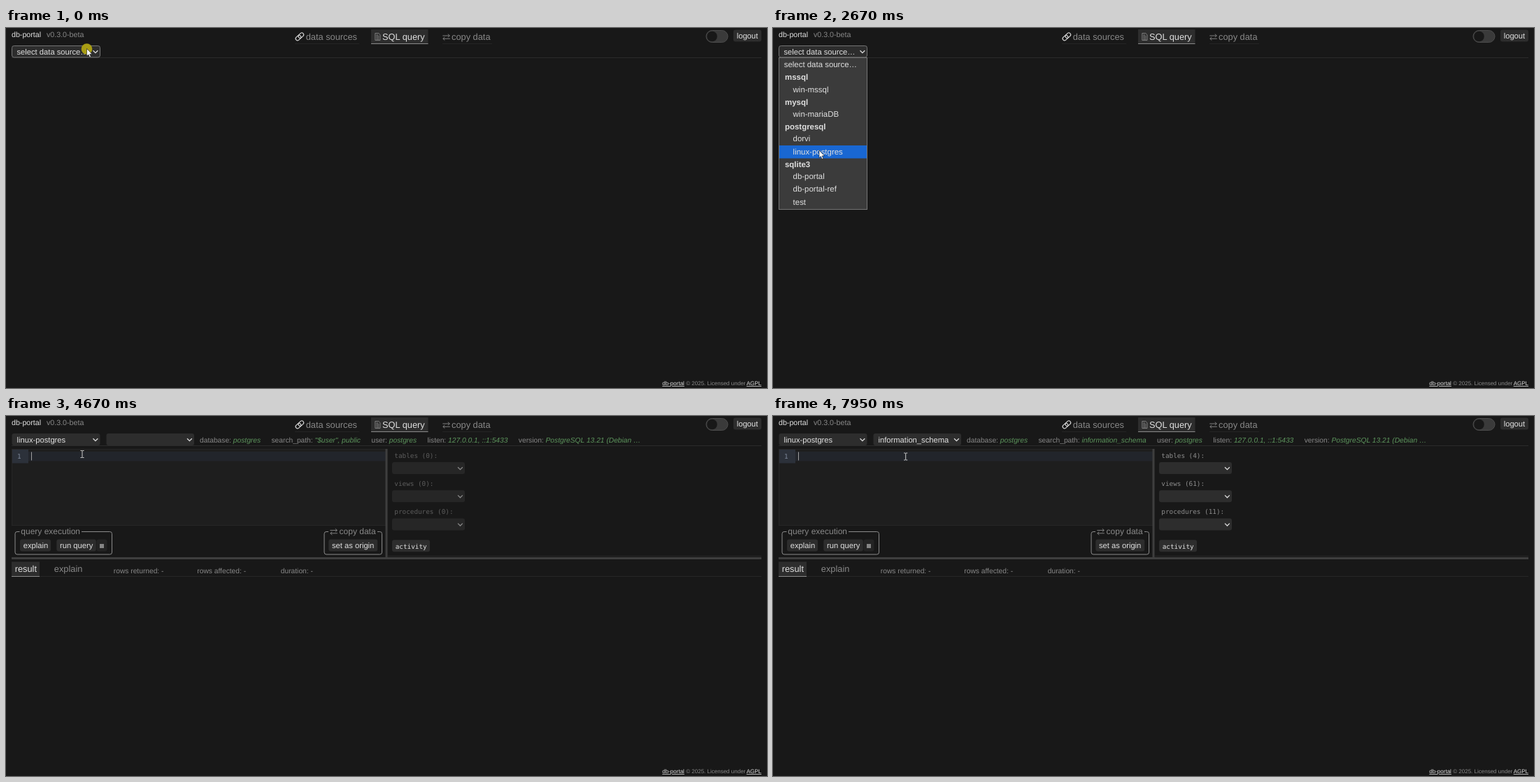
An HTML page for the animation above (8 s loop, 1088 by 515 pixels).

```html
<!DOCTYPE html>
<html lang="en">
<head>
<meta charset="utf-8">
<title>db-portal</title>
<style>
html, body { margin: 0; width: 100%; height: 100%; overflow: hidden; background: #181818; }
svg { display: block; }
text { font: 11.2px "Liberation Sans", Arial, sans-serif; fill: #e0e0e0; text-rendering: geometricPrecision; white-space: pre; }
.nav { font-size: 12.8px; }
.title { font-size: 10.67px; }
.legend { font-size: 12px; }
.info { font-size: 10.24px; }
.foot { font-size: 8px; }
.list { font-size: 11.45px; }
.mono { font: 9.34px "DejaVu Sans Mono", monospace; }
.dim { fill: #888; }
.bold { font-weight: bold; }
.link { fill: #ddd; text-decoration: underline; }
.value { fill: #5d955d; font-style: italic; }
.box { fill: #2d2d2d; }
.line { fill: none; stroke: #8a8a8a; }
.icon { fill: none; stroke: #888; stroke-width: .9; }
.popup { fill: #3b3b3b; stroke: #757575; }
.focus { fill: none; stroke: #757575; }
.hover { fill: #1967d2; }
</style>
</head>
<body>
<svg id="stage" width="1088" height="515" viewBox="0 0 1088 515"></svg>
<script>
const LOOP = 8000;

// Markup helpers; `on` holds the time spans in which an element shows.
const text = (x, y, str, cls = '') => `<text x="${x}" y="${y}" class="${cls}">${str}</text>`;
const rect = (x, y, w, h, attrs = '') => `<rect x="${x}" y="${y}" width="${w}" height="${h}" ${attrs}/>`;
const path = (d, attrs = 'class="line"') => `<path d="${d}" ${attrs}/>`;
const group = (on, ...parts) => `<g data-on="${on}">${parts.join('')}</g>`;
const button = (x, y, w, label, cls) => rect(x, y, w, 17, 'rx="3" class="box"') + text(x + 4.7, y + 12.2, label, cls);
const swap = (x, y) => path(`M${x} ${y - 2}h10m-2.5-2.3 2.5 2.3-2.5 2.3M${x + 10.5} ${y + 2.3}h-10m2.5-2.3-2.5 2.3 2.5 2.3`, 'class="icon"');
const select = (x, y, w, fill = '#2d2d2d', arrow = '#ddd') =>
  rect(x, y, w, 17, `rx="3" fill="${fill}"`) +
  path(`M${x + w - 10} ${y + 7.2}l3.4 3.4 3.4-3.4`, `fill="none" stroke="${arrow}" stroke-width="1.3"`);

function header() {
  return [
    text(8, 13.2, 'db-portal', 'title'), text(58, 13.2, 'v0.3.0-beta', 'title dim'),
    rect(522, 2, 81.5, 20.5, 'class="box"'), path('M522 22.5h81.5'),
    path('M413 22.5h92M624 22.5h71', 'stroke="#242424"'),
    '<g transform="rotate(-42 420 12.5)" fill="none" stroke="#ddd" stroke-width="1.1">',
    rect(413.2, 9.6, 8.4, 5.4, 'rx="2.7"'), rect(418.4, 9.6, 8.4, 5.4, 'rx="2.7"'), '</g>',
    text(428.7, 17, 'data sources', 'nav dim'),
    path('M527.8 7.5h5l2.2 2.2v7.8h-7.2zM529.2 10h3M529.2 12h4.4M529.2 14h4.4M529.2 16h4.4', 'class="icon"'),
    text(538, 17, 'SQL query', 'nav'),
    swap(624.3, 13), text(637, 17, 'copy data', 'nav dim'),
    rect(1001, 3.5, 31, 17, 'rx="8.5" fill="#3a3a3a" stroke="#4c4c4c"'),
    '<circle cx="1009.5" cy="12" r="7.3" fill="#181818"/>',
    button(1040, 2.5, 40, 'logout'),
    path('M8 42.5h1072', 'stroke="#2b2b2b"'),
    text(938.3, 511, 'db-portal', 'foot link'),
    text(972.2, 511, '© 2025. Licensed under', 'foot dim'),
    text(1058.7, 511, 'AGPL', 'foot link'),
  ].join('');
}

function info(searchPath) {
  const facts = {
    database: 'postgres', search_path: searchPath, user: 'postgres',
    listen: '127.0.0.1, ::1:5433', version: 'PostgreSQL 13.21 (Debian …',
  };
  const spans = Object.entries(facts).map(([key, value], i) =>
    `<tspan dx="${i ? 15.4 : 0}">${key}: </tspan><tspan class="value">${value}</tspan>`);
  return text(277, 37.8, spans.join(''), 'info dim');
}

function workspace() {
  return [
    rect(8.5, 47.5, 534.5, 109, 'fill="#1e1e1e" stroke="#262626"'),
    rect(9, 48, 23, 19.5, 'fill="#2c313a"'),
    rect(32, 51, 511, 13.5, 'fill="#22252b"'),
    text(16, 61, '1', 'mono" style="fill:#7d8799'),
    rect(542.5, 47, 3, 155.5, 'fill="#3e3e3e"'),
    rect(8, 202, 1072, 3, 'fill="#3e3e3e"'),
    path('M546 200.5h534M8 229.5h1072', 'stroke="#272727"'),
    path('M19.5 165.5H16q-3 0-3 3V195q0 3 3 3h132.5q3 0 3-3v-26.5q0-3-3-3H108'),
    text(21.3, 169.3, 'query execution', 'legend dim'),
    button(20, 176.5, 44, 'explain'), button(72.3, 176.5, 56.5, 'run query'),
    rect(129.5, 176.5, 15, 17, 'rx="3" fill="#242424"'), rect(134, 183, 6, 6, 'fill="#858585"'),
    path('M461 165.5h-3q-3 0-3 3V195q0 3 3 3h76.5q3 0 3-3v-26.5q0-3-3-3H531'),
    swap(463.3, 165.5), text(476.6, 169.3, 'copy data', 'legend dim'),
    button(461.3, 176.5, 70, 'set as origin'),
    rect(8, 208.5, 40, 21, 'class="box"'), path('M8 229.5h40'),
    text(12.7, 223.3, 'result', 'nav'), text(68.8, 223.3, 'explain', 'nav dim'),
    ...['rows returned', 'rows affected', 'duration'].map((s, i) =>
      text(153.8 + i * 119.5, 224.8, s + ': -', 'info dim')),
  ].join('');
}

function objects(counts) {
  const empty = !counts[0];
  return ['tables', 'views', 'procedures'].map((name, i) => {
    const y = 66 + i * 40.2;
    return text(555.3, y - 6, `${name} (${counts[i]}):`, `mono" style="fill:${empty ? '#5c5c5c' : '#8c8c8c'}`) +
      select(552, y, 104, empty ? '#262626' : '#2d2d2d', empty ? '#888' : '#ddd');
  }).join('') + button(552, 177.3, 54, 'activity', 'mono');
}

// Menu rows: label, middle, left edge (group headings have none).
const menu = [
  ['select data source…', 51.5, 15.7], ['mssql', 70], ['win-mssql', 87.5, 28.6], ['mysql', 105.5],
  ['win-mariaDB', 122.5, 28.6], ['postgresql', 141], ['dorvi', 158, 28.6], ['linux-postgres', 176.8, 28.6],
  ['sqlite3', 195], ['db-portal', 212, 28.6], ['db-portal-ref', 230, 28.6], ['test', 248.5, 28.6],
];

document.getElementById('stage').innerHTML = [
  header(),
  select(8.5, 25, 126),
  group('0-3430', text(15.5, 38, 'select data source…')),
  group('3430-8000', text(15.5, 38, 'linux-postgres'), workspace(), select(143.5, 25, 125.5)),
  group('3180-3430', text(143, 37.3, 'connecting', 'nav dim')),
  group('3430-6950', info('"$user", public')),
  group('6950-8000', info('information_schema')),
  group('3430-3680 6440-6950', button(552, 60, 54, 'activity', 'mono')),
  group('3680-6440', objects([0, 0, 0])),
  group('6950-8000', objects([4, 61, 11])),
  group('6440-8000', text(150.5, 38, 'information_schema')),
  group('3680-4180 4670-5170 7450-8000', path('M36.5 51.5v12', 'stroke="#a0a0a0"')),
  group('0-3180', rect(8.5, 25.5, 126, 16.5, 'rx="3" class="focus"')),
  group('5170-6440', rect(143.5, 25.5, 125, 16.5, 'rx="3" class="focus"')),
  group('680-3180',
    rect(8.5, 42.5, 126, 217, 'class="popup"'),
    rect(9, 43, 125, 18.5, 'id="hover" class="hover"'),
    ...menu.map(([label, y, x]) => text(x || 17, y + 4, label, x ? 'list' : 'list bold'))),
  group('5440-6440',
    rect(143.5, 42.5, 125, 34, 'class="popup"'),
    group('5440-6180', rect(144, 43, 124, 16.5, 'class="hover"')),
    group('6180-6440', rect(144, 59.5, 124, 16.5, 'class="hover"')),
    text(150.5, 71.5, 'information_schema', 'list')),
  group('0-250 680-940', '<circle cx="115.5" cy="30" r="7.8" fill="#a89d14"/>'),
  '<g id="cursor">',
  path('M0 0V10.7L2.4 8.6 4.1 12.5 5.9 11.7 4.2 7.9H7.5Z', 'id="arrow" fill="#fff" stroke="#111" stroke-width=".6"'),
  path('M-2.5-5h2l.5.5.5-.5h2M0-4.5v9M-2.5 5h2l.5-.5.5.5h2', 'id="beam" fill="none" stroke="#ccc"'),
  '</g>',
].join('');

// Pointer stops: time, x, y, shape, hovered menu row.
const stops = [
  [0, 115.5, 29.5, 'arrow', 0], [1440, 113, 44, 'arrow', 0], [1680, 103.7, 61, 'arrow', 0],
  [1940, 94, 90, 'arrow', 2], [2180, 80, 127, 'arrow', 4], [2420, 65.5, 173.5, 'arrow', 7],
  [2670, 66, 175, 'arrow', 7], [4180, 74, 140, 'beam'], [4430, 92, 92, 'beam'],
  [4670, 109, 54.5, 'beam'], [4920, 180, 48, 'beam'], [5170, 238, 33, 'arrow'],
  [6180, 234, 63, 'arrow'], [6440, 234, 68, 'beam'], [7200, 229.5, 68, 'beam'],
  [7450, 216, 64, 'beam'], [7700, 200, 60, 'beam'], [7950, 189.7, 58, 'beam'],
];

const timed = [...document.querySelectorAll('[data-on]')].map(el =>
  ({ el, spans: el.dataset.on.split(' ').map(s => s.split('-').map(Number)) }));
const byId = id => document.getElementById(id);
const show = (el, on) => { el.style.display = on ? '' : 'none'; };

function render(now) {
  const t = now % LOOP;
  for (const { el, spans } of timed) show(el, spans.some(([from, to]) => t >= from && t < to));
  const [, x, y, shape, row = 0] = stops.filter(s => s[0] <= t).pop();
  byId('cursor').setAttribute('transform', `translate(${x} ${y})`);
  show(byId('arrow'), shape === 'arrow');
  show(byId('beam'), shape === 'beam');
  byId('hover').setAttribute('y', menu[row][1] - 8.8);
}

const start = performance.now();
(function tick() {
  render(performance.now() - start);
  requestAnimationFrame(tick);
})();
</script>
</body>
</html>
```
